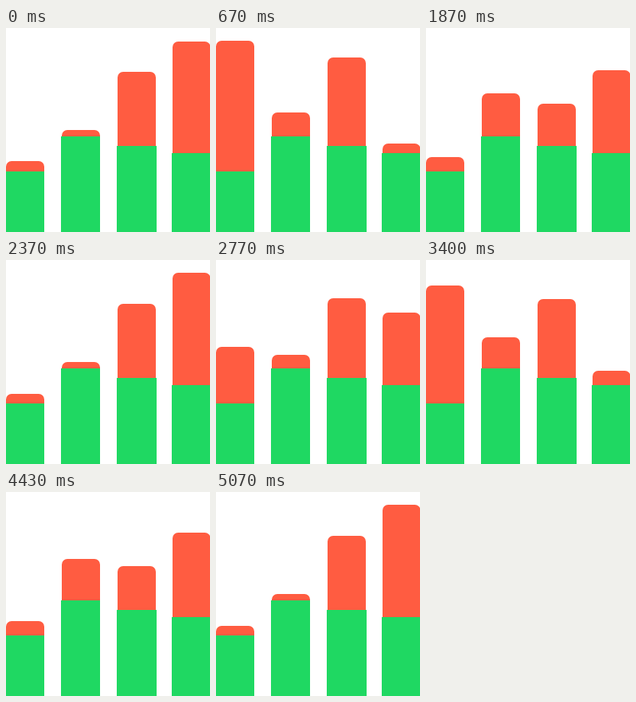
Recreate the animation shown at these times as an HTML page with a canvas. Size 256 by 256 pixels, loop 5110 ms.

```html
<!DOCTYPE html>
<html lang="en">
<head>
<meta charset="utf-8">
<title>Bars</title>
<style>
html, body { margin: 0; width: 100%; height: 100%; overflow: hidden; background: #fff; }
canvas { display: block; width: 256px; height: 256px; }
</style>
</head>
<body>
<canvas id="stage" width="256" height="256"></canvas>
<script>
const ctx = document.getElementById('stage').getContext('2d');
const SIZE = 256, CYCLE = 2555, MOVE = 600, RADIUS = 7;

// x and width of each red bar; left, right and top of its green part
const bars = [
  { x: 0, w: 48, left: 0, right: 48, base: 180 },
  { x: 70, w: 48, left: 69, right: 118, base: 136 },
  { x: 140, w: 48, left: 139, right: 189, base: 148 },
  { x: 209, w: 47.5, left: 208, right: 256, base: 157 }
];

// tops of the red bars in each pose
const rise = [168, 128, 55, 16];
const dip = [16, 106, 37, 145];
const peak = [155, 30, 139, 94];

const moves = [
  { at: -60, from: rise, to: dip },
  { at: 663, from: dip, to: peak },
  { at: 1565, from: peak, to: rise },
  { at: CYCLE - 60, from: rise, to: dip }
];

const ease = u => u < 0.5 ? 4 * u ** 3 : 1 - 4 * (1 - u) ** 3;

function topsAt(time) {
  const t = time % CYCLE;
  const move = moves.filter(m => m.at <= t).pop();
  const k = ease(Math.min(1, (t - move.at) / MOVE));
  return move.from.map((y, i) => Math.round(y + (move.to[i] - y) * k));
}

function draw(time) {
  const tops = topsAt(time);
  ctx.fillStyle = '#fff';
  ctx.fillRect(0, 0, SIZE, SIZE);
  bars.forEach((b, i) => {
    ctx.fillStyle = '#ff5c41';
    ctx.beginPath();
    ctx.roundRect(b.x, tops[i], b.w, SIZE - tops[i], [RADIUS, RADIUS, 0, 0]);
    ctx.fill();
    ctx.fillStyle = '#1fd862';
    ctx.fillRect(b.left, b.base, b.right - b.left, SIZE - b.base);
  });
}

const start = performance.now();
function tick() {
  draw(Math.max(0, performance.now() - start));
  requestAnimationFrame(tick);
}
tick();
</script>
</body>
</html>
```
